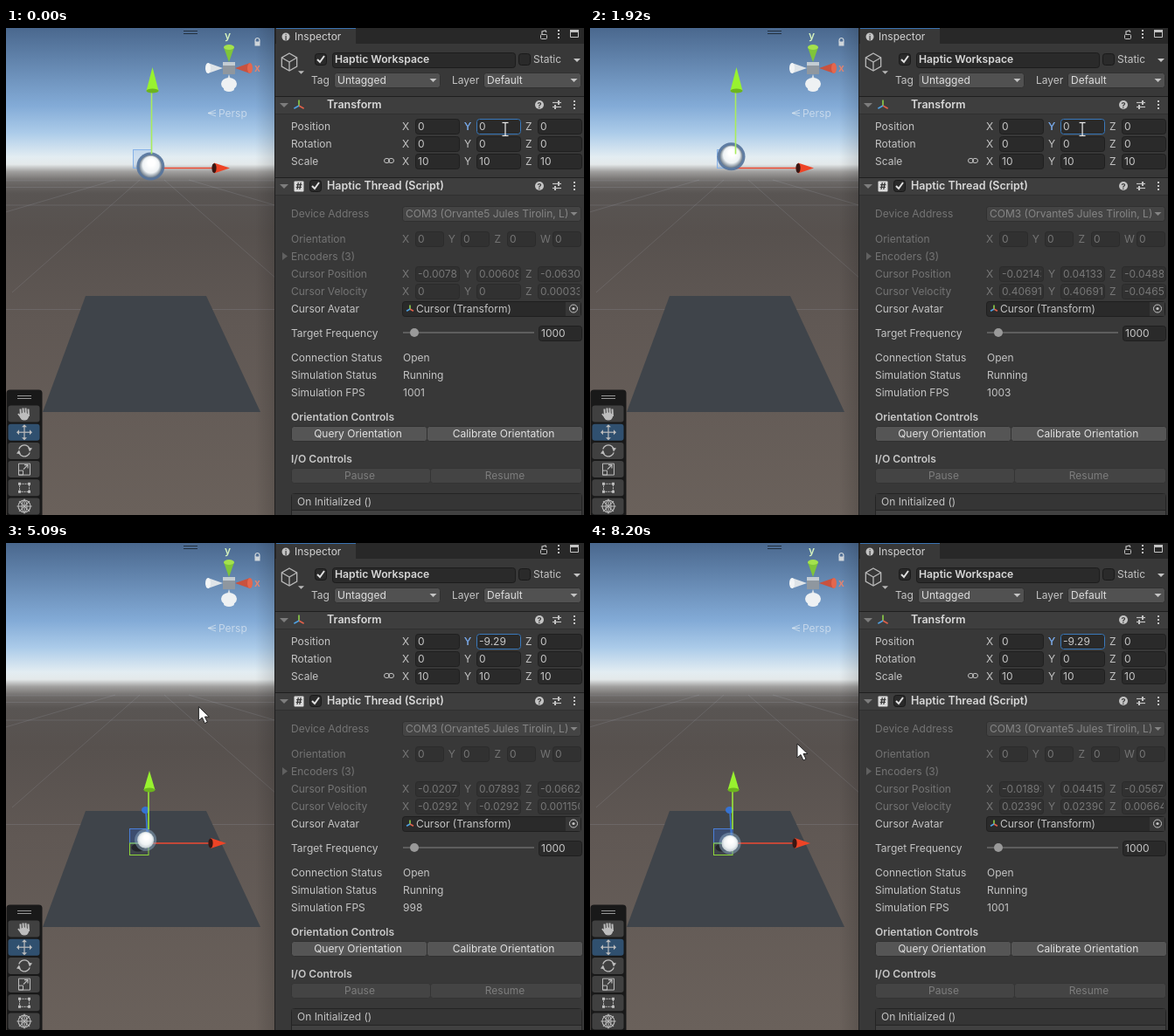
Recreate the animation shown at these times as an HTML page with a canvas. Size 661 by 558 pixels, loop 8270 ms.

```html
<!DOCTYPE html>
<html lang="en">
<head>
<meta charset="utf-8">
<title>Haptic workspace</title>
<style>
html, body { margin: 0; width: 661px; height: 558px; overflow: hidden; background: #383838; }
canvas { display: block; }
</style>
</head>
<body>
<canvas id="stage" width="661" height="558"></canvas>
<script>
const W = 661, H = 558, LOOP = 8270, STEP = 67.24;
const view = document.getElementById('stage').getContext('2d');
const still = document.createElement('canvas');
still.width = W; still.height = H;
let c = still.getContext('2d');

// ---- drawing helpers ----
function rect(x, y, w, h, fill) { c.fillStyle = fill; c.fillRect(x, y, w, h); }

function box(x, y, w, h, fill, edge, r = 3) {
  c.beginPath(); c.roundRect(x + .5, y + .5, w - 1, h - 1, r);
  if (fill) { c.fillStyle = fill; c.fill(); }
  if (edge) { c.strokeStyle = edge; c.lineWidth = 1; c.stroke(); }
}

function text(s, x, y, color = '#c4c4c4', weight = 400, align = 'left', size = 12) {
  c.font = `${weight} ${size}px Inter, "Liberation Sans", sans-serif`;
  c.textAlign = align; c.textBaseline = 'alphabetic';
  c.fillStyle = color; c.fillText(s, x, y + 4);
}

function path(p) {
  c.beginPath();
  for (let i = 0; i < p.length; i += 2) c.lineTo(p[i], p[i + 1]);
}

function line(color, width, ...p) {
  path(p); c.strokeStyle = color; c.lineWidth = width; c.stroke();
}

function poly(fill, ...p) {
  path(p); c.closePath(); c.fillStyle = fill; c.fill();
}

function oval(x, y, rx, ry, fill, edge, width = 1) {
  c.beginPath(); c.ellipse(x, y, rx, ry, 0, 0, 7);
  if (fill) { c.fillStyle = fill; c.fill(); }
  if (edge) { c.strokeStyle = edge; c.lineWidth = width; c.stroke(); }
}

// calls paint(i) n times, each turned by a further nth of a circle about x, y
function around(n, x, y, paint) {
  for (let i = 0; i < n; i++) {
    c.save(); c.translate(x, y); c.rotate(i * 2 * Math.PI / n); paint(i); c.restore();
  }
}

function down(x, y, color, w = 4) { poly(color, x - w, y - w / 2, x + w, y - w / 2, x, y + w / 2); }

function ramp(x1, y1, stops) {
  const g = c.createLinearGradient(x1 && x1 - 22, 0, x1, y1);
  stops.forEach(([at, color]) => g.addColorStop(at, color));
  return g;
}

function field(s, x, y, w, dim, edge) {
  box(x, y - 9, w, 18, dim ? '#313131' : '#2a2a2a', edge || (dim ? '#2b2b2b' : '#1f1f1f'));
  c.save();
  c.beginPath(); c.rect(x + 2, y - 9, w - 5, 18); c.clip();
  text(s, x + 3, y, dim ? '#777' : '#c8c8c8');
  c.restore();
}

function button(s, x, y, w, dim) {
  box(x, y - 9, w, 18, dim ? '#444' : '#555', dim ? '#343434' : '#303030');
  text(s, x + w / 2 - 1.5, y, dim ? '#7d7d7d' : '#e2e2e2', 400, 'center');
}

function dropdown(s, x, y, w, dim) {
  box(x, y - 9, w, 18, dim ? '#444' : '#515151', '#303030');
  text(s, x + 4, y, dim ? '#858585' : '#dedede');
  down(x + w - 8.5, y, dim ? '#858585' : '#c4c4c4');
}

function check(x, y, on) {
  box(x, y, 14, 14, '#2a2a2a', '#191919');
  if (on) line('#e0e0e0', 2, x + 3, y + 7, x + 6, y + 10, x + 11, y + 3);
}

function dots(x, y) { for (let i = -1; i < 2; i++) rect(x - 1, y + i * 4 - 1, 2, 2, '#c4c4c4'); }

function grip(x, y, color) { rect(x, y, 16, 1, color); rect(x, y + 3, 16, 1, color); }

// ---- fixed picture ----
function drawScene() {
  rect(0, 0, 307, H, ramp(0, H, [[0, '#4a688e'], [.16, '#83abd7'], [.215, '#abcbe9'], [.265, '#e3edf2'],
    [.28, '#e4e9ea'], [.295, '#a09f9e'], [.315, '#6d6a68'], [.34, '#595553'], [.42, '#57514e'],
    [.6, '#605854'], [1, '#6a615b']]));
  for (let i = 0; i < 4; i++) line('rgba(200,215,225,.12)', 1, 0, 162.5 + 160 / (1 + i * 1.5) ** 1.5, 307, 162.5 + 160 / (1 + i * 1.5) ** 1.5);
  for (let i = -3; i < 4; i += 2) line('rgba(200,215,225,.12)', 1, 167 + i * 14, 174, 167 + i * 160, 303);
  rect(285, 0, 22, H, ramp(307, 0, [[0, 'rgba(0,0,0,0)'], [1, 'rgba(0,0,0,.13)']]));
  poly('#3f444a', 91, 307, 229, 307, 291, 440, 42, 440);

  grip(203, 3, '#23303f');
  box(284, 15, 7, 6, '#cfd5da', null, 0); oval(287.5, 14.5, 2.5, 3, null, '#cfd5da', 1.2);

  // orientation widget: right, bottom, left, top
  const arms = ['#c9523f', '#d6dde2', '#dfe4e8', '#7fc53a'], caps = ['#e4674e', '#eef1f3', '#f3f5f6', '#a4e24d'];
  around(4, 255, 46, i => {
    poly(arms[i], 7, 0, 24, -6, 24, 6);
    oval(24, 0, 3, 6, caps[i]);
  });
  oval(255, 64, 9, 7, '#eef1f3');
  rect(248, 39, 14, 14, '#8f979f'); rect(248, 39, 14, 4, '#c3ccd3');
  text('y', 250, 9, '#d5f2bd', 600); text('x', 284, 46, '#e4836f', 600);
  const pale = 'rgba(227,235,242,.65)';
  line(pale, 1, 240, 94, 231, 97.5, 240, 101);
  line(pale, 1, 231, 97.5, 240, 97.5);
  text('Persp', 243, 98, pale);
}

function drawTools() {
  const ink = '#bdbdbd', row = i => 442 + i * 21.2;
  box(0, 414, 42, 150, '#191919', null, 4);
  grip(13, 421, '#999');
  for (let i = 0; i < 6; i++) box(2, row(i) - 10, 37, 20, i === 1 ? '#30506f' : '#404040');
  // hand
  oval(21, 445, 5, 4.5, ink);
  for (let i = 0; i < 4; i++) line(ink, 2, 16.5 + i * 3, 435 + Math.abs(i - 1.5), 17 + i * 3, 445);
  line(ink, 2, 14, 442, 18, 447);
  // move, rotate, scale, frame, all
  around(4, 21, row(1), () => { line(ink, 1.2, 0, 0, 8, 0); poly(ink, 9, 0, 6, 3, 6, -3); });
  around(2, 21, row(2), () => {
    c.beginPath(); c.arc(0, 0, 6.5, .3, 2.6); c.strokeStyle = ink; c.lineWidth = 1.3; c.stroke();
    poly(ink, -9, 3, -4, 4, -6, -1);
  });
  box(14, row(3) - 7, 14, 14, null, ink, 0); box(14, row(3) + 1, 6, 6, null, ink, 0);
  line(ink, 1.2, 20, row(3), 25, row(3) - 5); line(ink, 1.2, 21, row(3) - 5, 25, row(3) - 5, 25, row(3) - 1);
  c.setLineDash([2, 1]); box(15, row(4) - 5, 12, 10, null, ink, 0); c.setLineDash([]);
  around(2, 21, row(4), () => { rect(-7, -6, 3, 3, ink); rect(4, -6, 3, 3, ink); });
  oval(21, row(5), 7, 7, null, ink, 1.1); oval(21, row(5), 3, 7, null, ink);
  around(8, 21, row(5), () => line(ink, 1, 0, 0, 8.5, 0));
}

function header(y, title) {
  rect(308, y - 10, 353, 1, '#1f1f1f');
  rect(308, y - 9, 353, 19, '#3e3e3e');
  rect(308, y + 10, 353, 1, '#303030');
  down(318, y + .5, '#7d7d7d', 5);
  text(title, 367, y, '#d8d8d8', 600, 'left', 12.5);
  oval(610, y, 5, 5, '#c4c4c4'); text('?', 610, y, '#3e3e3e', 700, 'center', 9);
  around(2, 630, y, () => { line('#c4c4c4', 1.2, -5, -2.5, 5, -2.5); rect(1, -5, 2, 5, '#c4c4c4'); });
  dots(650, y);
}

function axisIcon(x, y, size) {
  const colors = ['#8fd14a', '#e0604a', '#4fa0e0'];
  around(3, x, y, i => line(colors[i], 1.6, 0, 0, 0, -size));
}

const AXES = ['X', 'Y', 'Z'], label = i => 453 + Math.round(i * 70.5), slot = i => 468 + i * 70;
function vector(y, value, dim) {
  AXES.forEach((name, i) => {
    text(name, label(i), y, dim ? '#777' : '#c4c4c4');
    if (value) field(value, slot(i), y, 51, dim);
  });
}

function labels(names, y, gap, color) {
  names.forEach((s, i) => text(s, 326, y + i * gap, color));
}

function drawPanel() {
  const dim = '#747474', ink = '#c4c4c4';
  rect(307, 0, 354, H, '#383838');
  rect(307, 0, 354, 18, '#282828');
  rect(309, 0, 91, 19, '#383838'); rect(309, 0, 91, 1, '#3a72b0');
  rect(307, 0, 1, H, '#1f1f1f');
  oval(320, 10, 4.5, 4.5, ink); text('i', 320, 10, '#383838', 700, 'center', 8);
  text('Inspector', 330, 10, '#d2d2d2');
  box(611, 7, 8, 6, null, ink, 1); line(ink, 1.2, 613, 7, 613, 4, 617, 3, 618, 5);
  dots(632, 7);
  box(645, 2, 10, 9, null, ink, 0); rect(645, 2, 10, 3, ink);

  // object header
  c.beginPath();
  for (let i = 0; i < 6; i++) c.lineTo(324 + 10 * Math.sin(i * Math.PI / 3), 39 - 10 * Math.cos(i * Math.PI / 3));
  c.closePath(); c.strokeStyle = '#b8b8b8'; c.lineWidth = 1.3; c.stroke();
  around(3, 324, 39, () => line('#b8b8b8', 1.3, 0, 0, 0, 10));
  down(337.5, 51, '#b8b8b8', 3.5);
  check(353, 29, true); check(586, 29, false);
  box(373, 28, 210, 18, '#2a2a2a', '#1c1c1c');
  text('Haptic Workspace', 376, 36, '#d8d8d8', 600, 'left', 12.2);
  text('Static', 603, 36); down(653, 37, ink);
  text('Tag', 349, 60); dropdown('Untagged', 375, 60, 122);
  text('Layer', 510, 60); dropdown('Default', 546, 60, 112);

  header(88, 'Transform'); axisIcon(335, 89, 6.5);
  labels(['Position', 'Rotation', 'Scale'], 113, 20);
  ['0', '0', '10'].forEach((s, i) => vector(113 + i * 20, s));
  box(432, 149, 7, 6, null, ink); box(437, 149, 7, 6, null, ink);

  header(181, 'Haptic Thread (Script)');
  box(329, 175, 12, 13, '#dcdcdc', null, 1); text('#', 335, 181, '#333', 700, 'center', 11);
  check(347, 174, true);
  text('Device Address', 326, 213, dim);
  dropdown('COM3 (Orvante5 Jules Tirolin, L)', 453, 213, 205, true);
  labels(['Orientation', 'Encoders (3)', 'Cursor Position', 'Cursor Velocity'], 242, 20, dim);
  [...AXES, 'W'].forEach((n, i) => {
    text(n, 453 + i * 52.7, 242, dim); field('0', Math.round(468 + i * 52.4), 242, 33, true);
  });
  poly('#606060', 316, 257, 322, 261.5, 316, 266);
  vector(282, null, true); vector(302, null, true);
  text('Cursor Avatar', 326, 322);
  box(453, 313, 205, 18, '#2a2a2a', '#1f1f1f'); axisIcon(462, 322, 4.5);
  text('Cursor (Transform)', 469, 322);
  rect(640, 314, 17, 16, '#373737');
  oval(649, 321.5, 4.5, 4.5, null, ink); oval(649, 321.5, 1.6, 1.6, ink);
  text('Target Frequency', 326, 350);
  rect(454, 348, 150, 2, '#5e5e5e'); oval(467, 349, 5, 5, '#999');
  field('1000', 609, 350, 50);
  labels(['Connection Status', 'Simulation Status', 'Simulation FPS'], 378, 20);
  text('Open', 454, 378); text('Running', 454, 398);
  text('Orientation Controls', 326, 446, '#c8c8c8', 600, 'left', 12.1);
  button('Query Orientation', 326, 465, 156); button('Calibrate Orientation', 481, 465, 179);
  text('I/O Controls', 326, 494, '#c8c8c8', 600, 'left', 12.1);
  button('Pause', 326, 513, 160, true); button('Resume', 485, 513, 174, true);
  box(326, 533, 333, 40, '#414141', '#242424');
  rect(327, 534, 331, 18, '#353535'); rect(327, 552, 331, 1, '#242424');
  text('On Initialized ()', 333, 543);
}

// ---- motion ----
// key poses of the device: time, position, upward and forward speed, rate
const POSES = [
  { t: 0, x: -.00783, y: .00608, z: -.06304, up: 0, fwd: .00033, fps: 1001 },
  { t: 1150, x: -.05152, y: .12422, z: -.02774, up: .79734, fwd: -.06772, fps: 1003 },
  { t: 1920, x: -.02143, y: .04133, z: -.04882, up: .40691, fwd: -.04652, fps: 1003 },
  { t: 3120, x: -.02004, y: .06294, z: -.06173, up: -.01403, fwd: .00081, fps: 1002 },
  { t: 5090, x: -.02073, y: .07893, z: -.06622, up: -.02923, fwd: .00115, fps: 998 },
  { t: 6910, x: -.01483, y: -.03013, z: -.05904, up: -.01524, fwd: .46074, fps: 1000 },
  { t: 8200, x: -.01893, y: .04415, z: -.05672, up: .0239, fwd: .00664, fps: 1001 }
];
const DRAG = 2640, DROP = 4250, LABEL = 527;

const part = (t, a, b) => Math.min(1, Math.max(0, (t - a) / (b - a)));
const easeOut = u => 1 - (1 - u) ** 2;

// between poses the hand bobs twice, ever more gently
function device(t) {
  const i = POSES.findLastIndex(p => p.t <= t), a = POSES[i], b = POSES[i + 1] || a;
  const q = a.t + Math.floor((t - a.t) / STEP) * STEP, gap = b.t - a.t || 1, u = (q - a.t) / gap;
  const mix = k => a[k] + (b[k] - a[k]) * u;
  const size = .25 * Math.exp(-q / 1400) + .02;
  const bob = size * Math.sin(2 * Math.PI * u) ** 2;
  const speed = size * 2000 * Math.PI / gap * Math.sin(4 * Math.PI * u);
  return {
    q, x: mix('x') - bob * .1, y: mix('y') + bob, z: mix('z') + bob * .1,
    up: mix('up') + speed, fwd: mix('fwd') + speed * .1, fps: Math.round(mix('fps'))
  };
}

function mouse(t) {
  const slide = easeOut(part(t, DRAG, DROP)), away = part(t, 4900, 5211);
  return {
    x: 571 - 44 * part(t, 1830, 2330) - 400 * slide + 110 * easeOut(away),
    y: 116 + 5 * part(t, 1920, 2600) + 109 * away,
    height: -9.29 * slide
  };
}

// parabola through the values at heights 0, -4.69 and -9.29
function bend(v, a, b, d) {
  const m = -4.69, n = -9.29;
  return a * (v - m) * (v - n) / (m * n) + b * v * (v - n) / (m * (m - n)) + d * v * (v - m) / (n * (n - m));
}

function drawBall(x, y, v) {
  const r = bend(v, 16, 13, 12.5), core = bend(v, 13, 10.5, 9.5);
  oval(x, y, r, r, v ? 'rgba(140,170,195,.5)' : 'rgba(84,115,156,.9)');
  const g = c.createRadialGradient(x + 1, y - core * .35, core * .3, x, y, core);
  g.addColorStop(0, '#fff'); g.addColorStop(.6, '#eef2f4'); g.addColorStop(1, v ? '#c0cbd0' : '#6f7d8b');
  oval(x, y, core, core, g);
}

function drawHandles(hand, v) {
  const bx = bend(v, 166.5, 165, 163), by = bend(v, 160.5, 267.5, 344);
  const top = bend(v, 45, 170, 261), tip = bend(v, 256, 254, 252);
  const x = bx + 1 + bend(v, 280, 240, 210) * hand.x;
  const y = by + bend(v, 0, 5, 5) - bend(v, 322, 215, 110) * hand.y;

  if (v < -3.4) oval(bend(v, 90, 121, 151), bend(v, 292, 317.5, 349), 7.5, 4.5, '#24272b');

  const size = bend(v, 21, 22, 21.5), up = bend(v, 21, 18, 16.5), low = bend(v, 0, 9, 13.5);
  c.fillStyle = v ? 'rgba(55,95,180,.35)' : 'rgba(120,165,225,.2)';
  c.fillRect(bx - size, by - up, size, up);
  c.lineWidth = 1;
  c.strokeStyle = v ? '#4a7fd8' : '#86b2e8';
  c.strokeRect(bx - size, by - up, size, up);
  if (low > 1) {
    c.strokeStyle = '#8fd83a'; c.strokeRect(bx - size, by, size, low);
    const z = bend(v, 164, 246, 306);
    line('#3f7bdc', 1.5, bx - 3, z, bx - 1, by);
    oval(bx - 3.5, z, 4.5, 4, '#3672d2');
  }
  line('#ee4a32', 1.6, bx, by, tip - 18, by);
  poly('#ee4426', tip - 18, by - 6, tip, by, tip - 18, by + 6);
  oval(tip - 18, by, 2.6, 5.5, '#3a1612');

  drawBall(x, y, v);
  const half = bend(v, 7, 6.5, 6.5), base = top + bend(v, 27, 23, 22);
  line(v ? '#9be83a' : '#a9ec5d', 1.6, bx, by - 16, bx, base);
  poly('#98f22f', bx + 1 - half, base, bx + 1, top, bx + 1 + half, base);
  oval(bx + 1, base, half, 2.5, '#6cb41e');
}

function drawMouse(t, { x, y }) {
  c.save(); c.translate(x, y);
  if (t < 2330) {
    line('#eee', 1.2, 0, -7, 0, 7);
    around(2, 0, 0, () => line('#eee', 1.2, -3.5, 7.5, 3.5, 7.5));
  } else {
    if (t > DRAG - 90 && t < DROP + 150) oval(-1, 0, 12, 12, 'rgba(190,174,20,.92)');
    const shape = [0, 0, 0, 16, 4, 12.5, 7, 19, 10, 17.5, 7, 11.5, 12, 11.5];
    poly('#fff', ...shape);
    c.strokeStyle = '#222'; c.lineWidth = 1; c.stroke();
  }
  c.restore();
}

const show = n => n === 0 ? '0' : n.toFixed(6);

function draw(t) {
  const hand = device(t), m = mouse(hand.q), v = m.height;
  c = view;
  c.drawImage(still, 0, 0);
  drawHandles(hand, v);
  text('Y', label(1), 113, '#5f9bea');
  field(v ? v.toFixed(2) : '0', slot(1), 113, 51, false, '#3a79bb');
  [hand.x, hand.y, hand.z].forEach((n, i) => field(show(n), slot(i), 282, 51, true));
  [hand.up, hand.up, hand.fwd].forEach((n, i) => field(show(n), slot(i), 302, 51, true));
  text(String(hand.fps), 454, 418);
  drawMouse(hand.q, m);
}

drawScene();
drawTools();
drawPanel();
const start = performance.now();
function tick() {
  draw((performance.now() - start) % LOOP);
  requestAnimationFrame(tick);
}
draw(0);
requestAnimationFrame(tick);
</script>
</body>
</html>
```
